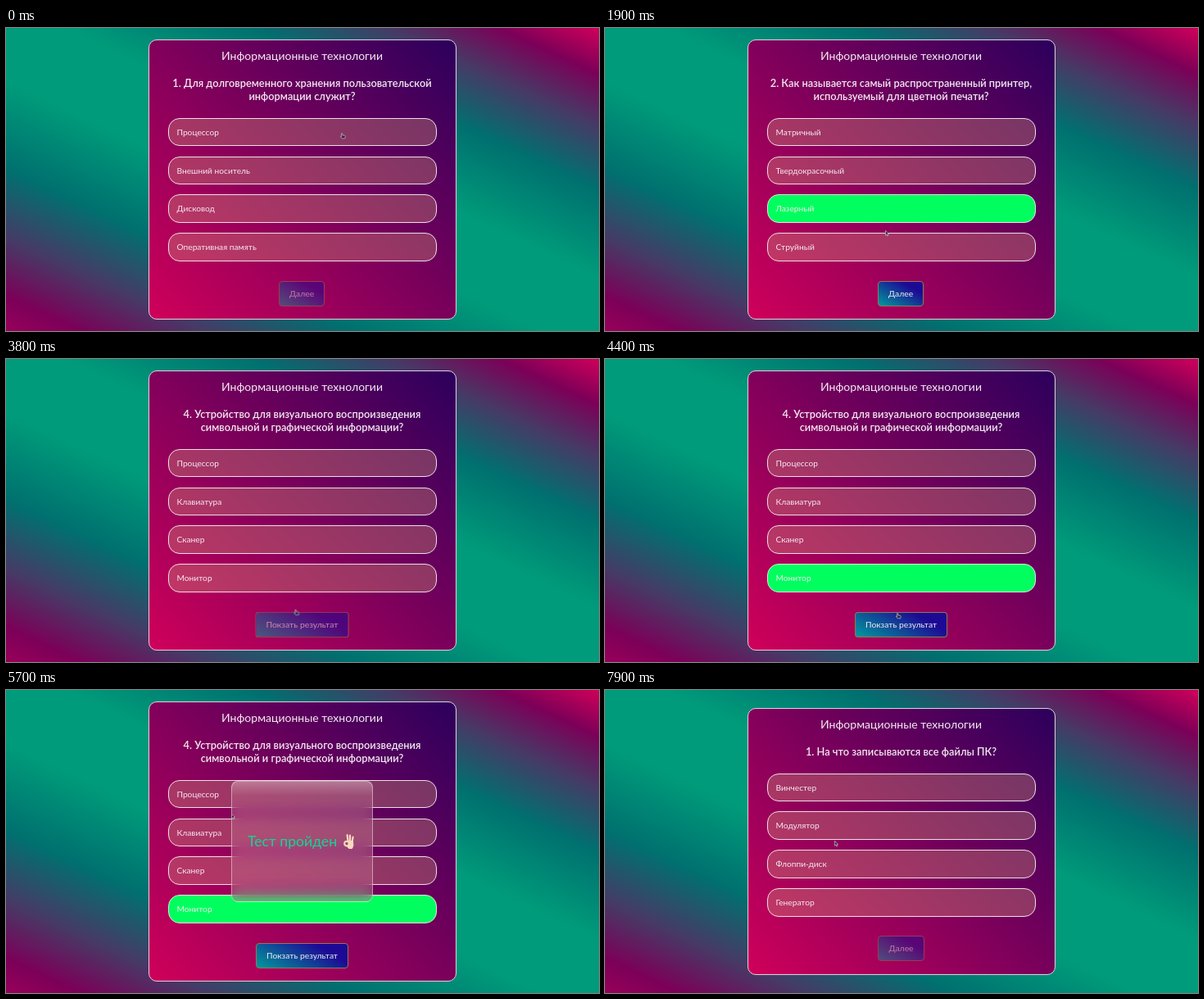
Recreate the animation shown at these times as an HTML page. Size 724 by 370 pixels, loop 8 s.

```html
<!DOCTYPE html>
<html lang="ru">
<head>
<meta charset="utf-8">
<title>Тест</title>
<style>
html, body { margin: 0; width: 100%; height: 100%; overflow: hidden; }
body {
  position: relative;
  font-family: Lato, "Open Sans", "Noto Sans", sans-serif;
  color: #f4e9f2;
  background: linear-gradient(205deg,
    #d0005a 0, #7c0058 8%, #463a66 17%, #00706f 28%,
    #009b7a 43%, #009b7a 57%,
    #00706f 72%, #463a66 84%, #7c0058 94%, #99005a 100%);
}
.scene {
  position: absolute; inset: 0 1px 0 0;
  display: flex; align-items: center; justify-content: center;
  visibility: hidden;
}
.card {
  box-sizing: border-box; width: 376px; padding: 9px 23px 15.7px;
  border: 1px solid #e3cfe0; border-radius: 10px;
  background: linear-gradient(45deg, #d0005a, #2b005c);
  text-align: center;
}
h1 { margin: 0 0 14.5px; font-size: 14px; font-weight: 400; line-height: 20px; }
h2 { margin: 0 0 18.3px; font-size: 12.8px; font-weight: 600; line-height: 16.5px; white-space: pre; }
.option {
  box-sizing: border-box; height: 34.5px; margin-bottom: 12.3px; padding-left: 10px;
  border: 1px solid #ecdfe8; border-radius: 14px;
  background: rgba(205, 150, 120, .36);
  font-size: 10.2px; line-height: 32.5px; text-align: left;
}
.button {
  display: inline-block; box-sizing: border-box; height: 30.5px; margin-top: 11.7px; padding: 0 12px;
  border: 1px solid #8f7a52; border-radius: 4px;
  background: linear-gradient(30deg, #009a9c, #1c0a94 75%);
  font-size: 10.3px; line-height: 28.5px; vertical-align: top; opacity: .5;
}
.modal {
  position: absolute; left: 275px; top: 110.5px; width: 173px; height: 148.5px; box-sizing: border-box;
  display: flex; align-items: center; justify-content: center; gap: 7px;
  border: 1px solid rgba(255, 255, 255, .45); border-radius: 8px;
  background:
    linear-gradient(rgba(255, 255, 255, .25), transparent 12%),
    rgba(200, 130, 150, .3);
  backdrop-filter: blur(8px);
  color: #12d596; font-size: 17.6px; opacity: 0;
}
.cursor { position: absolute; left: 0; top: 0; width: 8.5px; height: 10.2px; overflow: visible; }
.cursor path { fill: #272338; stroke: #d8ced8; stroke-width: .8; stroke-linejoin: round; }

.scene, .pick, .button, .modal, .cursor, .cursor path { animation: 8s infinite; }
.scene, .pick, .cursor path { animation-timing-function: step-end; }
.q1 { animation-name: show1; }
.q2 { animation-name: show2; }
.q3 { animation-name: show3; }
.q4 { animation-name: show4; }
.q5 { animation-name: show5; }
.q1 .pick { animation-name: pick1; }
.q2 .pick { animation-name: pick2; }
.q3 .pick { animation-name: pick3; }
.q4 .pick { animation-name: pick4; }
.q1 .button { animation-name: press1; }
.q2 .button { animation-name: press2; }
.q3 .button { animation-name: press3; }
.q4 .button { animation-name: press4; }
.modal { animation-name: pop; }
.cursor { animation-name: move; animation-timing-function: ease-in-out; }
.cursor .hand { animation-name: hand; }
.cursor .arrow { animation-name: arrow; }

@keyframes show1 { 0% { visibility: visible } 11.875%, 100% { visibility: hidden } }
@keyframes show2 { 0% { visibility: hidden } 11.875% { visibility: visible } 32.5%, 100% { visibility: hidden } }
@keyframes show3 { 0% { visibility: hidden } 32.5% { visibility: visible } 46.25%, 100% { visibility: hidden } }
@keyframes show4 { 0% { visibility: hidden } 46.25% { visibility: visible } 91.25%, 100% { visibility: hidden } }
@keyframes show5 { 0% { visibility: hidden } 91.25%, 100% { visibility: visible } }

@keyframes pick1 { 5%, 100% { background: #00ff5e } }
@keyframes pick2 { 21.25%, 100% { background: #00ff5e } }
@keyframes pick3 { 39.375%, 100% { background: #00ff5e } }
@keyframes pick4 { 51.875%, 100% { background: #00ff5e } }

@keyframes press1 {
  0%, 5% { opacity: .5; transform: none }
  7%, 10% { opacity: 1; transform: none }
  11.3%, 100% { opacity: 1; transform: scale(1.09) }
}
@keyframes press2 {
  0%, 12.8% { opacity: 1; transform: scale(1.09) }
  15.5%, 21.25% { opacity: .5; transform: none }
  23.5%, 27.5% { opacity: 1; transform: none }
  30%, 100% { opacity: 1; transform: scale(1.09) }
}
@keyframes press3 {
  0%, 32.5% { opacity: 1; transform: scale(1.09) }
  35%, 39.375% { opacity: .5; transform: none }
  41%, 43.5% { opacity: 1; transform: none }
  45.5%, 100% { opacity: 1; transform: scale(1.09) }
}
@keyframes press4 {
  0%, 46.25% { opacity: 1; transform: scale(1.09) }
  48.5%, 51.875% { opacity: .5; transform: none }
  53.5%, 55% { opacity: 1; transform: none }
  57%, 61% { opacity: 1; transform: scale(1.09) }
  64%, 100% { opacity: 1; transform: none }
}
@keyframes pop { 0%, 58.5% { opacity: 0 } 61.5%, 100% { opacity: 1 } }

@keyframes move {
  0% { transform: translate(408px, 128px) }
  3.75%, 6% { transform: translate(398px, 170px) }
  10.6%, 13.2% { transform: translate(368px, 321px) }
  19.5%, 21.9% { transform: translate(345px, 220px) }
  23.75% { transform: translate(342px, 247px) }
  28.5%, 32.8% { transform: translate(352px, 316px) }
  37.5%, 40% { transform: translate(324px, 171px) }
  44%, 46.5% { transform: translate(354px, 312px) }
  50.5%, 52.5% { transform: translate(335px, 264px) }
  55%, 58.5% { transform: translate(355px, 310px) }
  71.25% { transform: translate(275px, 151px) }
  75.6%, 91.25% { transform: translate(110px, -20px) }
  98.75%, 100% { transform: translate(280px, 184px) }
}
@keyframes hand {
  0% { opacity: 1 } 23.2% { opacity: 0 } 27% { opacity: 1 }
  60%, 100% { opacity: 0 }
}
@keyframes arrow {
  0% { opacity: 0 } 23.2% { opacity: 1 } 27% { opacity: 0 }
  60%, 100% { opacity: 1 }
}
</style>
</head>
<body>
<svg class="cursor" viewBox="0 0 10 12">
  <path class="hand" d="M1.8 .8q1-.8 1.5.4l.3 2.3 3 .6q.9.3.7 1.3L6.7 8H2.6L.5 5.3q-.2-.9.7-.8l1 .7z"/>
  <path class="arrow" d="M.5.4v6.8l1.6-1.4 1.1 2.4 1.2-.6-1.1-2.3 2-.2z"/>
</svg>
<script>
const questions = [
  ["1. Для долговременного хранения пользовательской\nинформации служит?",
    ["Процессор", "Внешний носитель", "Дисковод", "Оперативная память"], 1],
  ["2. Как называется самый распространенный принтер,\nиспользуемый для цветной печати?",
    ["Матричный", "Твердокрасочный", "Лазерный", "Струйный"], 2],
  ["3. Как на клавиатуре включить заглавыне буквы?",
    ["Alt+Ctrl", "Caps Lock", "Esc", "Enter"], 1],
  ["4. Устройство для визуального воспроизведения\nсимвольной и графической информации?",
    ["Процессор", "Клавиатура", "Сканер", "Монитор"], 3],
  ["1. На что записываются все файлы ПК?",
    ["Винчестер", "Модулятор", "Флоппи-диск", "Генератор"], -1]
];

const modal = `<div class="modal">Тест пройден
  <svg width="17" height="20" viewBox="0 0 17 20" fill="none" stroke="#f6d9bd" stroke-linecap="round">
    <path d="M6.5 9 5.6 2.2M9 9V2.6M11.6 10 12.6 4.6" stroke-width="2.2"/>
    <path d="M7.5 9.5 12.4 9.5Q14 15 11.5 18.6L7.4 18.4 5.6 16Q8 14.5 7.5 9.5" fill="#f6d9bd"/>
    <circle cx="5" cy="12.6" r="2.8" stroke-width="2"/>
  </svg></div>`;

const scene = ([title, options, answer], i) => `
  <div class="scene q${i + 1}">
    <div class="card">
      <h1>Информационные технологии</h1>
      <h2>${title}</h2>
      ${options.map((text, k) => `<div class="option${k === answer ? " pick" : ""}">${text}</div>`).join("")}
      <div class="button">${i === 3 ? "Покзать результат" : "Далее"}</div>
    </div>
    ${i === 3 ? modal : ""}
  </div>`;

document.body.insertAdjacentHTML("afterbegin", questions.map(scene).join(""));
</script>
</body>
</html>
```
